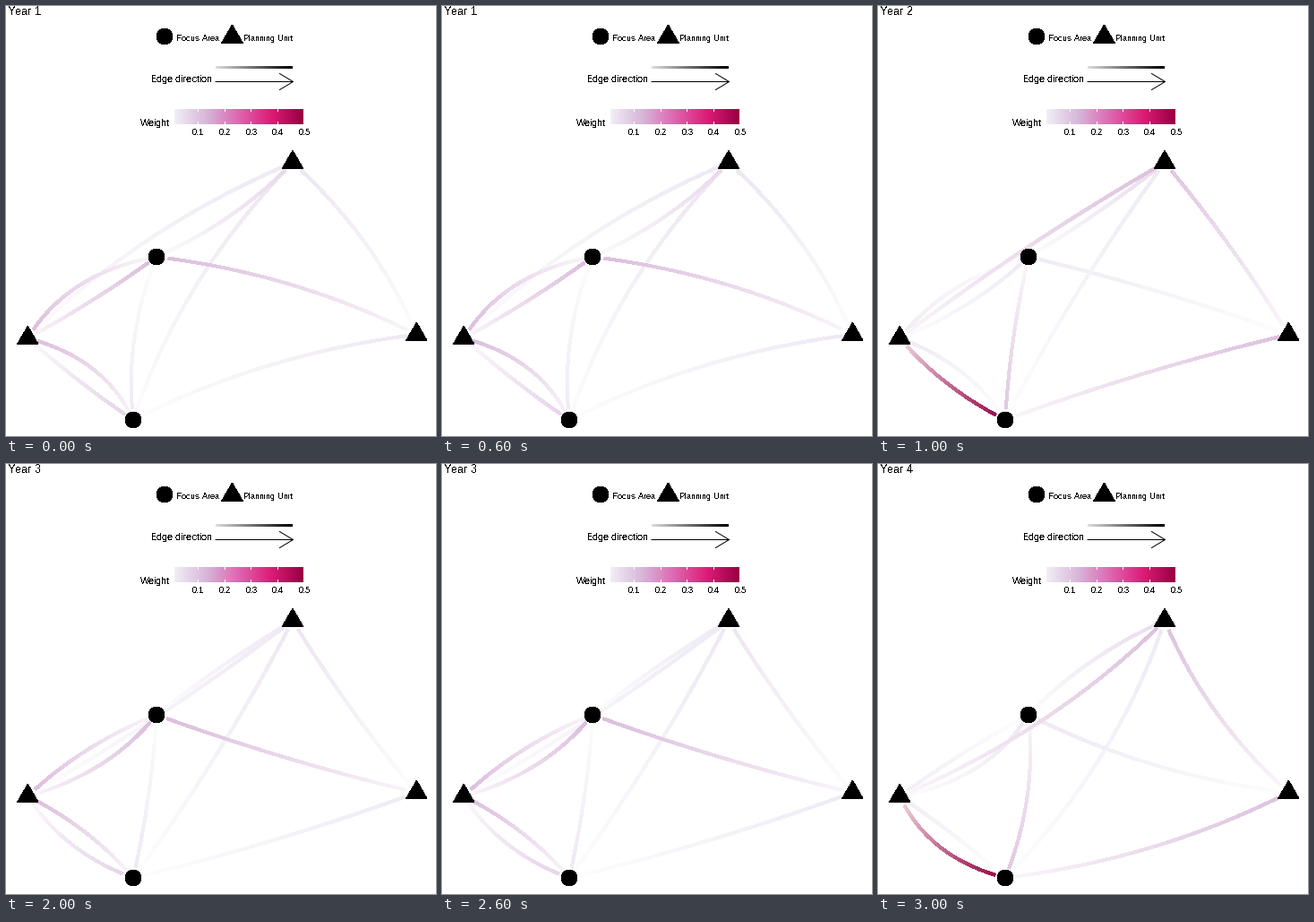
A matplotlib script that plays this animation: 480x480 px, repeating every 4000 ms.

```python
import numpy as np
import matplotlib.pyplot as plt
from matplotlib.animation import FuncAnimation
from matplotlib.collections import LineCollection
from matplotlib.colors import LinearSegmentedColormap
from matplotlib.patches import Circle, Polygon

SIZE, DPI = 480, 100
PX = 72 / DPI  # points per pixel
# sideways bulge between neighbouring strands, relative to the chord;
# the axes have unequal scales, so x and y differ
FAN_STEP = np.array([0.042, 0.028])
NODE_CAP = 11
MIN_ALPHA = 0.13

plt.rcParams.update({
    "font.family": "Liberation Sans",
    "text.hinting": "native",
    "text.hinting_factor": 1,
    "text.antialiased": False,
    "path.snap": False,
})
weight_map = LinearSegmentedColormap.from_list(
    "weight", ["#f1eef6", "#d7b5d8", "#df65b0", "#dd1c77", "#980043"])

NODES = {
    "top": (320, 174.8),
    "hub": (168, 280),
    "left": (24.3, 370.8),
    "base": (142, 462),
    "right": (458.3, 366.8),
}
FOCUS_AREAS = ("hub", "base")

# start, end, which of the two is the head, first fan rank, weight per year
EDGES = [
    ("top", "right", "top", 1.5, (.03, .10, .03, .11)),
    ("hub", "right", "hub", 1.5, (.12, .02, .12, .025)),
    ("base", "right", "right", 1.5, (.025, .11, .02, .11)),
    ("left", "top", "top", 1.5, (.025, .11, .02, .11)),
    ("top", "hub", "top", 1.5, (.06, .05, .025, .05)),
    ("base", "top", "top", 1.5, (.03, .02, .025, .02)),
    ("base", "hub", "base", 1.5, (.02, .10, .025, .10)),
    ("left", "hub", "left", 3.5, (.12, .015, .12, .01)),
    ("left", "hub", "hub", -.5, (.12, .02, .12, .025)),
    ("left", "base", "left", 3.5, (.12, .02, .12, .015)),
    ("left", "base", "base", -.5, (.07, .5, .07, .5)),
]

fig = plt.figure(figsize=(SIZE / DPI, SIZE / DPI), dpi=DPI, facecolor="white")
ax = fig.add_axes([0, 0, 1, 1])
ax.axis("off")


def weight_color(weight):
    return np.array(weight_map((weight - 0.01) / 0.49)[:3])


def fade(color, alpha):
    """Blend a colour onto white for each alpha value."""
    return 1 - alpha[:, None] * (1 - np.asarray(color))


def label(x, y, text, size, **kwargs):
    return ax.text(x, y, text, fontsize=size * PX, va="baseline", **kwargs)


def add_shape(patch):
    patch.set(color="black", linewidth=0, antialiased=False, zorder=5)
    ax.add_patch(patch)


def circle(x, y):
    add_shape(Circle((x, y), 8.9))


def triangle(x, y, radius=13.5):
    angles = np.radians([-90, 30, 150])
    add_shape(Polygon(np.column_stack([x + radius * np.cos(angles),
                                       y + radius * np.sin(angles)])))


def strand(start, end, rank):
    """Quadratic curve bulging sideways, cut short at both nodes."""
    a, b = np.array(NODES[start]), np.array(NODES[end])
    dx, dy = b - a
    control = (a + b) / 2 + 2 * rank * FAN_STEP * (dy, -dx)
    t = np.linspace(0, 1, 121)
    s = t[:, None]
    points = (1 - s) ** 2 * a + 2 * s * (1 - s) * control + s ** 2 * b
    clear = ((np.hypot(*(points - a).T) > NODE_CAP)
             & (np.hypot(*(points - b).T) > NODE_CAP))
    return points[clear], t[clear]


def pieces(points):
    """Short segments that overlap by half, so no seams show."""
    return np.stack([points[:-2], points[2:]], axis=1)


def draw_legends():
    circle(177, 34)
    triangle(252.5, 34.5)
    label(190, 39, "Focus Area", 9)
    label(265, 39, "Planning Unit", 9)

    label(162, 85, "Edge direction", 11)
    xs = np.linspace(234, 320, 80)
    ramp = np.linspace(MIN_ALPHA, 1, 78)
    ax.add_collection(LineCollection(
        pieces(np.column_stack([xs, np.full(80, 68.5)])),
        colors=fade((0, 0, 0), ramp), linewidths=3 * PX, antialiaseds=False))
    ax.plot([234, 320.5], [84.5, 84.5], color="black", lw=PX)
    ax.plot([305.5, 320.5, 305.5], [75.5, 84.5, 93.5], color="black", lw=PX)

    label(150, 134, "Weight", 11)
    ax.imshow(np.linspace(0, 1, 256)[None], cmap=weight_map, aspect="auto",
              extent=(188, 332, 132, 115), interpolation="bilinear")
    for i in range(1, 6):
        x = 185 + 29.6 * i
        if i < 5:
            tick = np.floor(x) + 0.5
            for y in (115, 129):
                ax.plot([tick, tick], [y, y + 3], color="white", lw=PX,
                        solid_capstyle="butt")
        label(x, 144, f"{i / 10:.1f}", 9, ha="center")


draw_legends()
for name, position in NODES.items():
    (circle if name in FOCUS_AREAS else triangle)(*position)

title = label(2, 10, "", 13)
edges = LineCollection([], linewidths=3 * PX, antialiaseds=False, zorder=2)
ax.add_collection(edges)
ax.set_xlim(0, SIZE)
ax.set_ylim(SIZE, 0)


def update(year):
    segments, colors = [], []
    # strongest edges last so that crossings keep their colour
    for start, end, head, rank, weights in sorted(EDGES, key=lambda e: e[4][year]):
        points, t = strand(start, end, rank - year)
        along = t if head == end else 1 - t
        alpha = MIN_ALPHA + (1 - MIN_ALPHA) * along[1:-1]
        segments.extend(pieces(points))
        colors.extend(fade(weight_color(weights[year]), alpha))
    edges.set_segments(segments)
    edges.set_color(colors)
    title.set_text(f"Year {year + 1}")
    return edges, title


animation = FuncAnimation(fig, update, frames=4, interval=1000,
                          repeat=True, repeat_delay=0)
plt.show()
```
